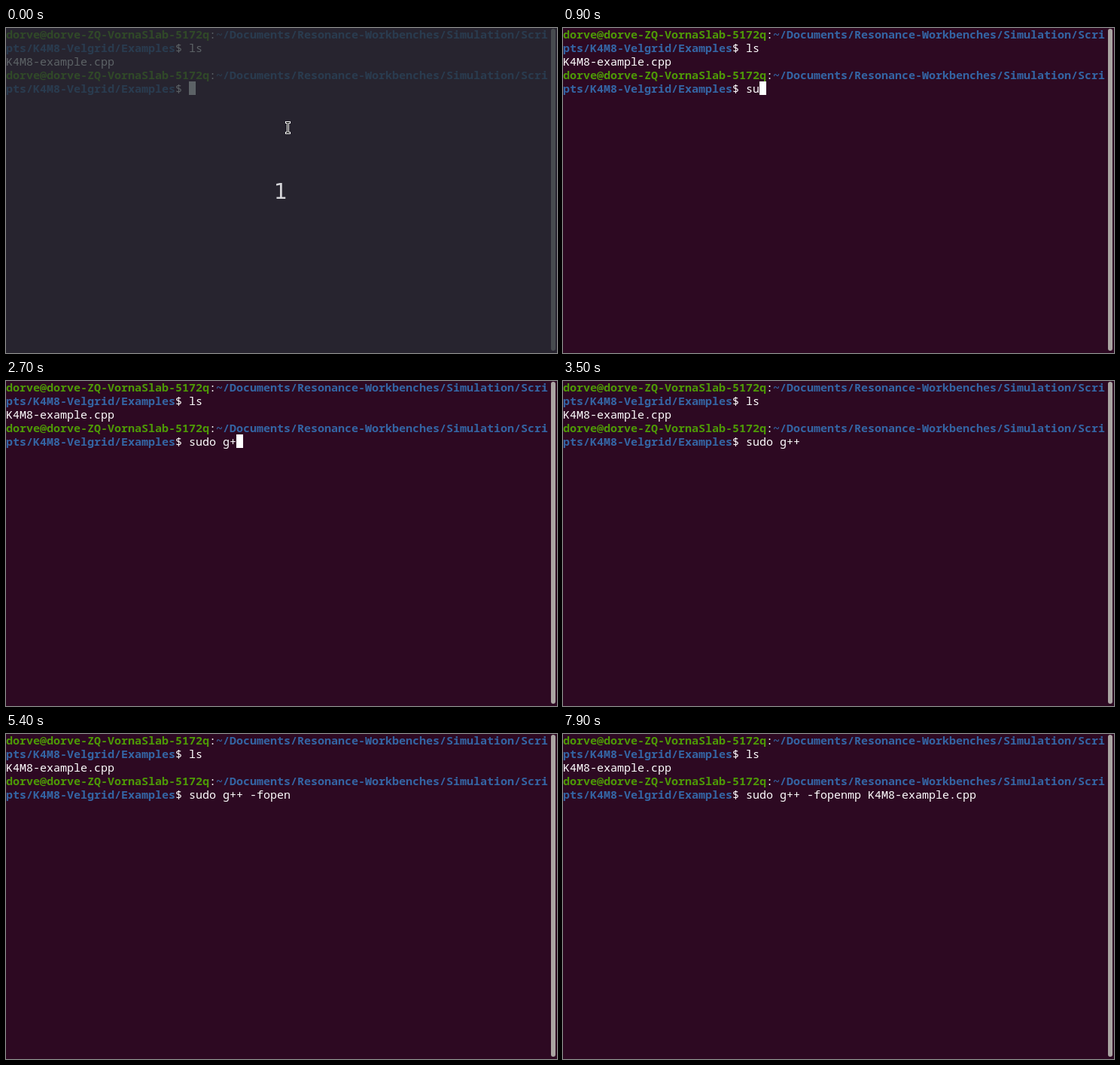
Recreate the animation shown at these times as an HTML page with a canvas. Size 732x432 px, loop 8000 ms.

```html
<!DOCTYPE html>
<html lang="en">
<head>
<meta charset="utf-8">
<title>Terminal</title>
<style>
  html, body { margin: 0; width: 100%; height: 100%; overflow: hidden; background: #2d0922; }
  canvas { display: block; }
</style>
</head>
<body>
<canvas id="stage" width="732" height="432"></canvas>
<script>
const ctx = document.getElementById('stage').getContext('2d');
const LOOP = 8000;
const CELL_W = 9, ROW_H = 18, BASELINE = 14;
const BG = '#2d0922', WHITE = '#ffffff', GREEN = '#4e9a06', BLUE = '#3465a4';

const USER = 'dorve@dorve-ZQ-VornaSlab-5172q';
const PATH_HEAD = '~/Documents/Resonance-Workbenches/Simulation/Scri';
const PATH_TAIL = 'pts/K4M8-Velgrid/Examples';
const FILE = 'K4M8-example.cpp';
const COMMAND = `sudo g++ -fopenmp ${FILE} `;
const INPUT_COL = PATH_TAIL.length + 2;

// [start in ms, typed characters, caret visible]
const STEPS = [
  [0, 0, 1], [200, 0, 0], [700, 0, 1], [800, 1, 1], [900, 2, 1], [1200, 3, 1],
  [1800, 3, 0], [1900, 3, 1], [2100, 4, 1], [2300, 5, 1], [2500, 6, 1],
  [2700, 7, 1], [2900, 8, 1], [3000, 9, 1], [3500, 9, 0], [3700, 9, 1],
  [4000, 10, 1], [4200, 11, 1], [4300, 12, 1], [4500, 13, 1], [4800, 14, 1],
  [5000, 15, 1], [5400, 15, 0], [5600, 15, 1], [5800, 16, 1], [6200, 17, 1],
  [6500, 18, 1], [6700, 20, 1], [7300, COMMAND.length, 1], [7900, COMMAND.length, 0]
];
const COUNTDOWN_END = 200;
const POINTER_END = 800;

function box(x, y, w, h, color) {
  ctx.fillStyle = color;
  ctx.fillRect(x, y, w, h);
}

// Writes on the character grid and returns the next free column.
function write(text, col, row, color, bold) {
  ctx.font = `${bold ? 'bold ' : ''}15px "Noto Sans Mono", monospace`;
  ctx.textAlign = 'left';
  ctx.fillStyle = color;
  for (const ch of text) ctx.fillText(ch, col++ * CELL_W, row * ROW_H + BASELINE);
  return col;
}

function prompt(row) {
  let col = write(USER, 0, row, GREEN, true);
  col = write(':', col, row, WHITE);
  write(PATH_HEAD, col, row, BLUE, true);
  col = write(PATH_TAIL, 0, row + 1, BLUE, true);
  write('$', col, row + 1, WHITE);
}

function scrollbar() {
  ctx.fillStyle = '#aaa5a2';
  ctx.beginPath();
  ctx.roundRect(724, 1, 6, 428, 3);
  ctx.fill();
}

function pointer() {
  box(371, 124, 7, 3, WHITE);
  box(371, 138, 7, 3, WHITE);
  box(373, 124, 3, 17, WHITE);
  box(372, 125, 5, 1, '#000');
  box(372, 139, 5, 1, '#000');
  box(374, 125, 1, 15, '#000');
}

function countdown() {
  box(0, 0, 732, 432, 'rgba(38, 46, 51, 0.75)');
  ctx.font = '28px "DejaVu Sans", sans-serif';
  ctx.textAlign = 'center';
  ctx.fillStyle = '#d6d6da';
  ctx.fillText('1', 365, 227);
}

function draw(t) {
  const [, typed, caret] = STEPS.findLast(step => step[0] <= t);
  box(0, 0, 732, 432, BG);
  prompt(0);
  write('ls', INPUT_COL, 1, WHITE);
  write(FILE, 0, 2, WHITE);
  prompt(3);
  const end = write(COMMAND.slice(0, typed), INPUT_COL, 4, WHITE);
  if (caret) box(end * CELL_W, 71, CELL_W, ROW_H, WHITE);
  scrollbar();
  if (t < COUNTDOWN_END) countdown();
  if (t < POINTER_END) pointer();
}

const start = performance.now();
function frame() {
  draw((performance.now() - start) % LOOP);
  requestAnimationFrame(frame);
}
frame();
</script>
</body>
</html>
```
